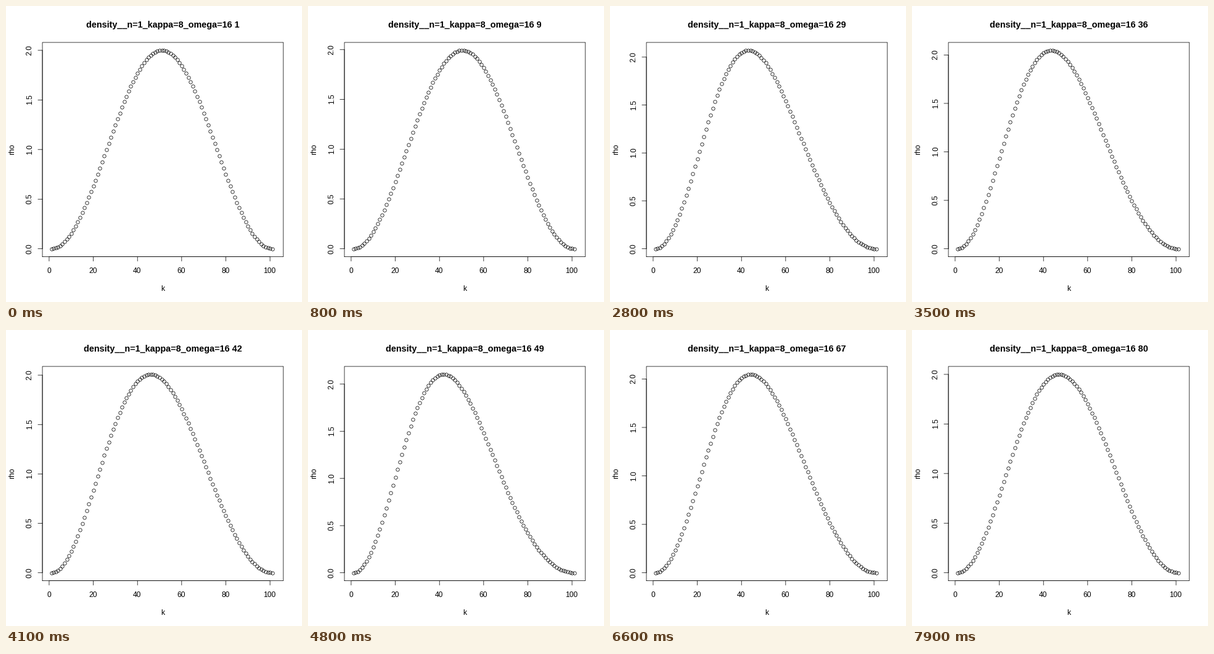
These frames come from a looping animation (480 by 480 pixels, 8 s). A matplotlib script:

```python
import numpy as np
import matplotlib.pyplot as plt
from matplotlib.animation import FuncAnimation

SIZE, DPI = 480, 72          # one point equals one pixel
FRAMES, INTERVAL = 80, 100
LINE = 14.4                  # height of one margin line
LEFT, RIGHT, TOP, BOTTOM = 59.04, 449.76, 59.04, 406.56
PEN = 0.75

plt.rcParams["font.family"] = "Liberation Sans"

# Particle in a box, ground state at rest, pushed sideways by a field.
LEVELS, FIELD, STEP = 12, 7.05, 0.1
n = np.arange(1, LEVELS + 1)
k = np.arange(1, 102)
waves = np.sqrt(2) * np.sin(np.pi * np.outer((k - 1) / 100, n))


def hamiltonian():
    a, b = np.meshgrid(n, n)
    odd = (a + b) % 2 == 1
    gap = np.where(odd, a**2 - b**2, 1)
    dipole = np.where(odd, -8 * a * b / (np.pi * gap) ** 2, 0)
    return np.diag((np.pi * n) ** 2 / 2) + FIELD * dipole


energy, modes = np.linalg.eigh(hamiltonian())


def density(t):
    state = modes @ (np.exp(-1j * energy * t) * modes[0])
    return np.abs(waves @ state) ** 2


def px(value):
    return LEFT + (value + 3.04) / 109.08 * (RIGHT - LEFT)


def py(value, peak):
    pad = (BOTTOM - TOP) * 0.04 / 1.08
    return BOTTOM - pad - value / peak * (BOTTOM - TOP - 2 * pad)


fig = plt.figure(figsize=(SIZE / DPI, SIZE / DPI), dpi=DPI, facecolor="white")
ax = fig.add_axes([0, 0, 1, 1])
ax.set_xlim(0, SIZE)
ax.set_ylim(SIZE, 0)
ax.axis("off")


def stroke(xs, ys):
    return ax.plot(xs, ys, color="black", lw=PEN, snap=False,
                   solid_capstyle="round", solid_joinstyle="round")[0]


def label(x, y, text, size=12, **style):
    return ax.text(x, y, text, size=size, ha="center", va="baseline",
                   rotation_mode="anchor", **style)


stroke([LEFT, RIGHT, RIGHT, LEFT, LEFT], [BOTTOM, BOTTOM, TOP, TOP, BOTTOM])
stroke([px(0), px(100)], [BOTTOM, BOTTOM])
for value in range(0, 101, 20):
    stroke([px(value)] * 2, [BOTTOM, BOTTOM + LINE / 2])
    label(px(value) - 0.5, BOTTOM + 1.8 * LINE + 0.5, str(value))

middle_x, middle_y = (LEFT + RIGHT) / 2, (TOP + BOTTOM) / 2
label(middle_x, BOTTOM + 3.8 * LINE + 0.5, "k")
label(LEFT - 3.2 * LINE, middle_y - 0.5, "rho", rotation=90)
title = label(middle_x, 34.7, "", size=14.4, weight="bold")

levels = np.arange(0, 2.1, 0.5)
axis = stroke([LEFT, LEFT], [0, 0])
ticks = [stroke([LEFT - LINE / 2, LEFT], [0, 0]) for _ in levels]
names = [label(LEFT - 1.2 * LINE, 0, f"{v:.1f}", rotation=90) for v in levels]
dots, = ax.plot([], [], "o", ms=5.4, mfc="none", mec="black", mew=PEN,
                snap=False)


def draw(i):
    rho = density(i * STEP)
    peak = rho.max()
    dots.set_data(px(k), py(rho, peak))
    axis.set_ydata(py(levels[[0, -1]], peak))
    for value, tick, name in zip(levels, ticks, names):
        y = py(value, peak)
        tick.set_ydata([y, y])
        name.set_y(y - 0.5)
    title.set_text(f"density__n=1_kappa=8_omega=16 {i + 1}")
    return [dots, title, axis, *ticks, *names]


anim = FuncAnimation(fig, draw, frames=FRAMES, interval=INTERVAL,
                     repeat=True, repeat_delay=0)
plt.show()
```
